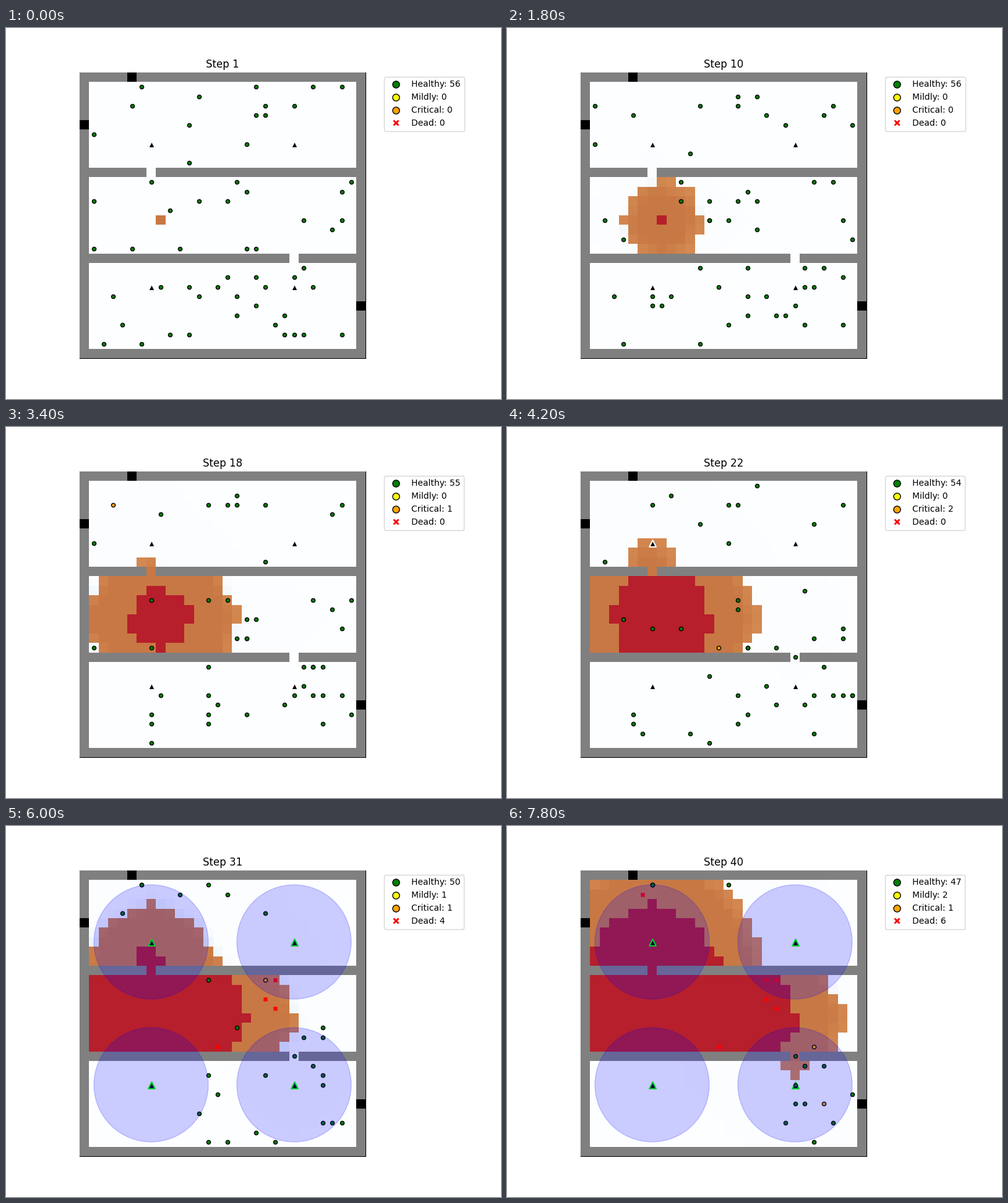
Recreate the animation shown at these times as a matplotlib script. Size 800x600 px, loop 8000 ms.

```python
import random

import matplotlib.pyplot as plt
import numpy as np
from matplotlib.animation import FuncAnimation
from matplotlib.colors import to_rgb
from matplotlib.lines import Line2D

random.seed(4)
rng = np.random.default_rng(4)

SIZE, STEPS, BURN_TIME, ALARM_STEP = 30, 40, 10, 23
ORIGIN = (15, 8)
GATES = [(10, 7), (19, 22)]
EXITS = [(0, 5), (5, 0), (24, 29)]
SENSORS = [(7, 7), (7, 22), (22, 7), (22, 22)]
ROOMS = [(1, 10, 14), (11, 19, 17), (20, 29, 25)]  # first row, end row, people

# casualties: where they are caught and when they start to suffer
CAUGHT = {(7, 7): 13, (18, 14): 21, (14, 20): 25, (13, 19): 26, (11, 20): 27,
          (11, 19): 31, (2, 6): 33, (18, 24): 40, (24, 25): 40}
SURVIVOR = (7, 7)

# ---------------------------------------------------------------- floor plan
is_open = np.ones((SIZE, SIZE), bool)
is_open[[0, 10, 19, 29], :] = False
is_open[:, [0, 29]] = False
for gate in GATES:
    is_open[gate] = True

SHIFTS = [(y, x) for y in (-1, 0, 1) for x in (-1, 0, 1)]


def distances(goals, diagonal=1.0, gate_cost=0.0):
    """Walking distance of every cell to the nearest goal, around the walls."""
    cost = np.where(is_open, 0, np.inf)
    field = np.full((SIZE, SIZE), np.inf)
    for g in GATES:
        cost[g] = gate_cost
    for g in goals:
        field[g] = 0
    for _ in range(2 * SIZE):
        for y, x in SHIFTS:
            step = diagonal if y and x else 1
            field = np.minimum(field, np.roll(field, (y, x), (0, 1)) + step + cost)
    return field


# ---------------------------------------------------------------- fire, smoke
# the fire advances one ragged ring every second step
reach = distances([ORIGIN], diagonal=1.5, gate_cost=1.5)
ignite = 2 * np.ceil(reach + rng.uniform(0, 1, reach.shape))
ignite[ORIGIN] = 0


def smoke_fields():
    s = np.zeros((SIZE, SIZE))
    s[ORIGIN] = 1
    fields = [s]
    for t in range(2, STEPS + 1):
        flow = 0
        for axis in (0, 1):
            for shift in (-1, 1):
                flow = flow + (np.roll(s, shift, axis) - s) * np.roll(is_open, shift, axis)
        s = (s + 0.15 * flow) * is_open
        s = np.where(ignite <= t, np.minimum(1, s + 0.3), s)
        fields.append(s)
    return fields


smoke = smoke_fields()
AIR, HAZE, FLAME, HOT, ASH = (np.array(to_rgb(c)) for c in
                              ("#fdfeff", "#c6dcee", "#da9258", "#c87844", "#b61f2b"))


def floor_image(t):
    s = smoke[t - 1][..., None]
    img = AIR + (HAZE - AIR) * s
    fire = ignite <= t
    img[fire] = (FLAME + (HOT - FLAME) * s)[fire]
    img[ignite + BURN_TIME <= t] = ASH
    img[~is_open] = to_rgb("gray")
    for cell in EXITS:
        img[cell] = 0
    return img


# ---------------------------------------------------------------- people
def walk(cell, field, left, t):
    """One random step off the fire that still allows arriving in time."""
    near = [(cell[0] + y, cell[1] + x) for y, x in SHIFTS]
    near = [n for n in near if field[n] < np.inf]
    safe = [n for n in near if ignite[n] > t or n in EXITS] or near
    ways = [n for n in safe if field[n] <= left]
    return random.choice(ways) if ways else min(safe, key=lambda n: field[n])


def trek(cell, legs, heedless=False):
    """Cells at each step; legs are (due step, distance field)."""
    track = [cell]
    for t in range(2, STEPS + 1):
        if cell:
            due, field = next((leg for leg in legs if t <= leg[0]), legs[-1])
            cell = walk(cell, field, max(0, due - t), -1 if heedless else t)
            if cell in EXITS:
                cell = None
        track.append(cell)
    return track


def populate():
    """All people as (track, onset of harm or None, fatal)."""
    starts = []
    for top, end, count in ROOMS:
        room = [(r, c) for r in range(top, end) for c in range(1, SIZE - 1)]
        starts += random.sample([p for p in room if p != ORIGIN], count)
    any_exit, east_exit = distances(EXITS), distances(EXITS[2:])

    people = []
    for spot, onset in CAUGHT.items():
        field = distances([spot])
        start = min(starts, key=lambda p: field[p])
        starts.remove(start)
        fatal = spot != SURVIVOR
        legs = [(onset, field)] if fatal else [(onset + 1, field), (onset + 6, any_exit)]
        people.append((trek(start, legs, fatal), onset, fatal))

    # the others leave slowly at first, then faster
    starts.sort(key=lambda p: any_exit[p] + random.uniform(0, 15))
    for k, start in enumerate(starts, 1):
        due = round(STEPS * (k / 35) ** (1 / 1.6))
        way = any_exit if start[0] < ROOMS[0][1] else east_exit
        people.append((trek(start, [(due, way)]), None, False))
    return people


people = populate()
HEALTHY, MILDLY, CRITICAL, DEAD = range(4)


def health(onset, fatal, t):
    if onset is None or t < onset:
        return HEALTHY
    if t == onset:
        return MILDLY
    return DEAD if fatal and t >= onset + 3 else CRITICAL


# ---------------------------------------------------------------- picture
fig, ax = plt.subplots(figsize=(8, 6), dpi=100)
fig.subplots_adjust(right=0.75)
floor = ax.imshow(floor_image(1), extent=(0, SIZE, SIZE, 0), interpolation="nearest")


def centers(points):
    return np.array([(c + 0.5, r + 0.5) for r, c in points]).reshape(-1, 2)


def dots(color, **style):
    style = {"s": 20, "edgecolors": "black", "linewidths": 1, "zorder": 1, **style}
    return ax.scatter([], [], c=color, **style)


sensors = dots("black", marker="^", s=60, edgecolors="white", linewidths=1.5)
sensors.set_offsets(centers(SENSORS))
fallen = dots("red", marker="X", edgecolors="red", linewidths=0.8)
healthy = dots("green")
hurt = dots("orange")
zones = [ax.add_patch(plt.Circle(xy, 6, color="blue", alpha=0.2, zorder=2))
         for xy in centers(SENSORS)]

ax.set(xlim=(0, SIZE), ylim=(SIZE, 0), xticks=[], yticks=[])
ax.spines[:].set_zorder(-1)
title = ax.set_title("Step 1")

names = ("Healthy", "Mildly", "Critical", "Dead")
marks = [("o", "green", "black"), ("o", "yellow", "black"), ("o", "orange", "black"),
         ("X", "red", "white")]
handles = [Line2D([0], [0], marker=m, color="w", markerfacecolor=face,
                  markeredgecolor=edge, markersize=8) for m, face, edge in marks]
legend = ax.legend(handles, names, loc="upper left", bbox_to_anchor=(1.05, 1))


def update(i):
    t = i + 1
    groups = [[] for _ in names]
    for track, onset, fatal in people:
        groups[health(onset, fatal, t)].append(track[i])
    for text, name, group in zip(legend.get_texts(), names, groups):
        text.set_text(f"{name}: {len(group)}")

    well, mild, critical, dead = ([p for p in group if p] for group in groups)
    healthy.set_offsets(centers(well))
    hurt.set_offsets(centers(mild + critical))
    fallen.set_offsets(centers(dead))

    alarm = t >= ALARM_STEP
    sensors.set_edgecolor("lime" if alarm else "white")
    for zone in zones:
        zone.set_visible(alarm)
    title.set_text(f"Step {t}")
    floor.set_data(floor_image(t))
    return []


anim = FuncAnimation(fig, update, frames=STEPS, interval=200, repeat=True,
                     repeat_delay=0, blit=False)
plt.show()
```
